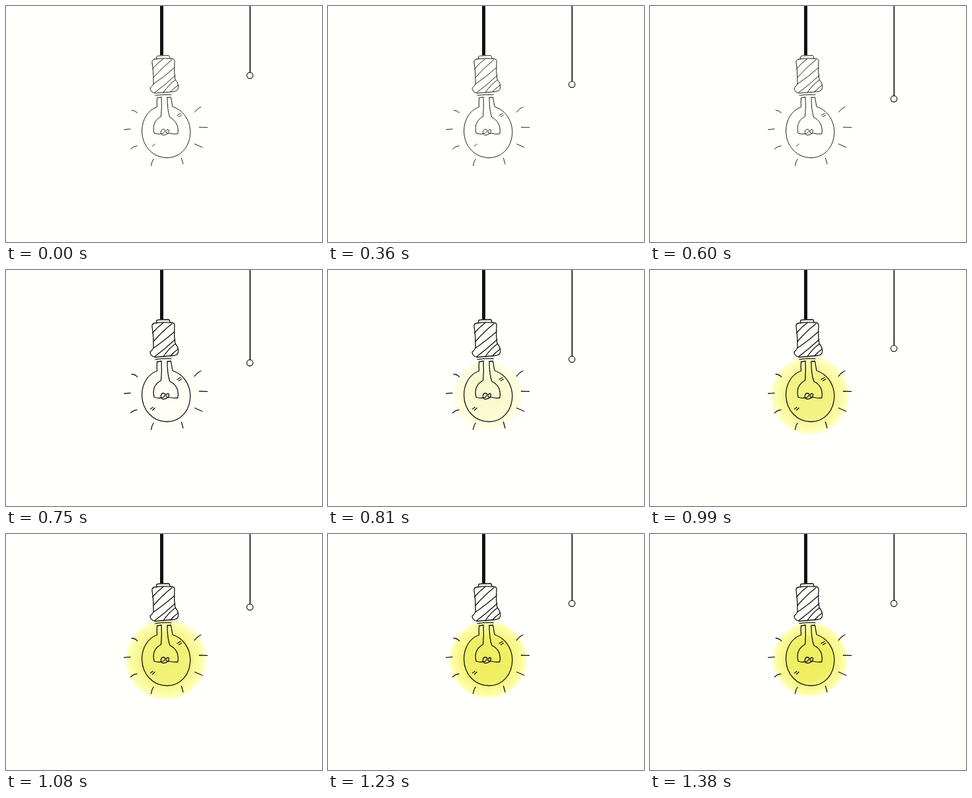
Animation of 480x360 px, one loop 1.41 s. Source, as an HTML page:

```html
<!DOCTYPE html>
<html lang="en">
<head>
<meta charset="utf-8">
<title>Light bulb</title>
<style>
  html, body { margin: 0; width: 100%; height: 100%; overflow: hidden; background: #fffffb; }
  svg { display: block; width: 480px; height: 360px; }
  .ink { fill: none; stroke: #111; stroke-linecap: round; stroke-linejoin: round; }
</style>
</head>
<body>
<svg viewBox="0 0 480 360">
  <defs>
    <radialGradient id="light">
      <stop offset="0" stop-color="#efee5c"/>
      <stop offset=".57" stop-color="#f0ef60"/>
      <stop offset=".68" stop-color="#f7f67f"/>
      <stop offset=".86" stop-color="#fcfc9f"/>
      <stop offset=".94" stop-color="#ffffb0"/>
      <stop offset="1" stop-color="#ffffc4" stop-opacity="0"/>
    </radialGradient>
  </defs>
  <rect width="480" height="360" fill="#fffffb"/>
  <circle id="glow" cx="243" cy="191.5" fill="url(#light)"/>

  <!-- socket -->
  <path fill="#fffffb" d="M226 81 L253 80 Q257 81 256 87 L257 112 Q263 119 261 126 Q260 131 250 131 L226 133 Q219 131 219 125 Q225 120 224 116 L222 87 Q221 82 226 81Z"/>
  <path fill="#111" d="M234 0H239V75H234Z"/>
  <g id="ink" class="ink">
    <path d="M228.5 81 V77.5 Q229 76 232 76 L246 75.5 Q249 75.5 249 80"/>
    <path d="M226 81 Q240 79 253 80.5 Q257 81 256 87 Q255 101 257 112 Q263 119 261.5 126 Q260 131 250 131 Q238 132 226 133 Q219 131 219 125 Q225 120 224 116 Q224 98 222 87 Q221 82 226 81Z"/>
    <path d="M222.500 96 Q230 87 239 80.500 M224 109 Q237 94 252 82 M224 119 Q239 109 256 94 M226 132 Q242 120 257 106 M239 132 Q247 120 257 113 M250 131 Q254 126 261 121"/>
    <path d="M227 136.300 Q239 134.800 251 135.300"/>
    <!-- glass and stem -->
    <path d="M236 139 L229.500 140 Q229 147 229.500 154 C215 159 206.500 174 206.500 191 C207 215 224 231.500 245 231.500 C266 231 280 214 280 191 C279 173 269 159 253 153.500 L250.500 139 L245 139.500"/>
    <path d="M236 139 Q237 154 235.500 168.500 C227 173 222 181 225 194 Q230 196 235 195 C241 195 244 188 239.500 188 C234 188 234 197 239 197 C246 197 250 189 246 188.500 C241 189 243 197 248 194 Q254 196 261 195 C263 182 257 174 249 170 Q245 160 245 139.500"/>
    <!-- rays -->
    <path d="M191 159 Q196 159 199.500 163 M179.500 188.500 L189 187.700 M189.500 218 Q193 214 199 213.300 M220.500 243.500 Q221 238 224 233.500 M266.500 232 L269 241 M286.500 210.500 L298 215.500 M293.500 185 L306 185.300 M286.500 162 Q291 156 296 154"/>
    <path d="M260 167 L265 164 M262.500 169 L266.500 166.500 M222.500 214 L226 210.500"/>
    <path id="glint" d="M219.500 212 L223 209.500"/>
  </g>

  <!-- pull cord -->
  <path id="cord" class="ink" stroke-width="1.700"/>
  <circle id="knob" class="ink" cx="370.500" r="4.700" stroke-width="1.200"/>
</svg>
<script>
const LOOP = 1410, STEP = 30;
const $ = id => document.getElementById(id);
const glow = $('glow'), ink = $('ink'), glint = $('glint'), cord = $('cord'), knob = $('knob');

// [time, value] pairs, linear in between
const PULL = [[210, 106], [675, 148.5], [1140, 106]];
const RADIUS = [[690, 50], [870, 56.5], [990, 60.5], [1080, 62.5], [1230, 60], [1380, 57.5]];
const POWER = [[690, 0], [750, .04], [870, .52], [990, .77], [1230, .97], [1380, .97]];

function at(track, t) {
  if (t <= track[0][0]) return track[0][1];
  for (let i = 1; i < track.length; i++) {
    const [t0, a] = track[i - 1], [t1, b] = track[i];
    if (t <= t1) return a + (b - a) * (t - t0) / (t1 - t0);
  }
  return track[track.length - 1][1];
}

function draw(now) {
  const t = Math.floor(now % LOOP / STEP) * STEP;
  const y = at(PULL, t), lit = t >= 690;
  cord.setAttribute('d', `M370.700 -4 V${y - 5}`);
  knob.setAttribute('cy', y);
  glow.setAttribute('r', at(RADIUS, t));
  glow.setAttribute('opacity', at(POWER, t));
  ink.setAttribute('stroke-width', lit ? 1.3 : .95);
  glint.setAttribute('opacity', lit ? 1 : 0);
}

const start = performance.now();
function tick() {
  draw(performance.now() - start);
  requestAnimationFrame(tick);
}
tick();
</script>
</body>
</html>
```
